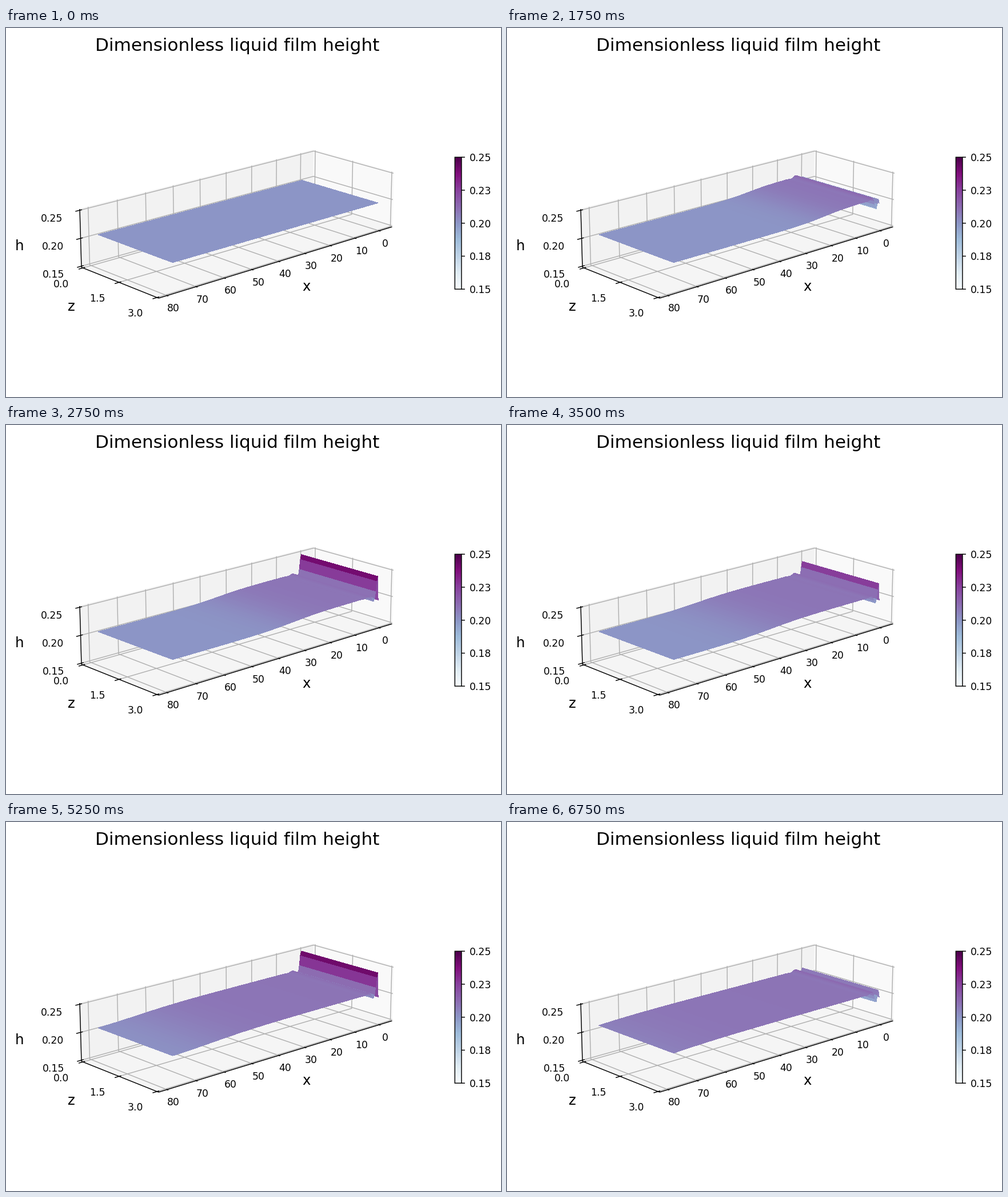
These frames come from a looping animation (866 px wide and 646 px high, 7000 ms). A matplotlib script:

```python
import numpy as np
import matplotlib.pyplot as plt
from matplotlib.animation import FuncAnimation
from matplotlib.collections import LineCollection, PolyCollection
from matplotlib.patches import Rectangle

W, H, DPI = 866, 646, 128
FRAMES, INTERVAL = 28, 250
LINE = 0.82
GRID = "#b0b0b0"
H_MIN, H_MAX = 0.15, 0.25
TICK_PX, LABEL_PX, TITLE_PX = 17.3, 24.4, 31.13

plt.rcParams["font.family"] = "DejaVu Sans"

fig = plt.figure(figsize=(W / DPI, H / DPI), dpi=DPI, facecolor="white")
ax = fig.add_axes([0, 0, 1, 1])
ax.axis("off")


def project(s, r, k):
    """Perspective view of the unit box: s along x, r along z, k up."""
    d = 1 + 0.122 * s - 0.049 * r - 0.0104 * k
    u = (132 + 470.8 * s + 121.9 * r - 4.34 * k) / d
    v = (419 - 76.3 * s + 30.8 * r - 105.3 * k) / d
    return u, v


def box_s(x):
    return 0.032 + (80 - x) / 88.3


def box_r(z):
    return 0.02 + 0.96 * z / 3


def box_k(h):
    return 0.02 + 0.96 * (h - H_MIN) / (H_MAX - H_MIN)


def path(*points):
    return [project(*p) for p in points]


def text(x, y, label, px=TICK_PX):
    ax.text(x, y, label, size=px * 72 / DPI, color="black",
            ha="center", va="baseline")


def lines(paths, color, z):
    ax.add_collection(LineCollection(paths, colors=color, linewidths=LINE,
                                     zorder=z))


def tick_label(point, offset, label):
    u, v = project(*point)
    text(u + offset[0], v + offset[1] + 6.4, label)


def draw_box():
    panes = [
        (path((0, 0, 0), (1, 0, 0), (1, 0, 1), (0, 0, 1)), "#f2f2f2"),
        (path((1, 0, 0), (1, 1, 0), (1, 1, 1), (1, 0, 1)), "#f9f9f9"),
        (path((0, 0, 0), (1, 0, 0), (1, 1, 0), (0, 1, 0)), "#f5f5f5"),
    ]
    colors = [c for _, c in panes]
    ax.add_collection(PolyCollection([p for p, _ in panes], facecolors=colors,
                                     edgecolors=colors, linewidths=LINE,
                                     zorder=1))

    grid, ticks = [], []
    t_out, t_in = 0.2 / 12, 0.1 / 12
    for x in range(0, 81, 10):
        s = box_s(x)
        grid.append(path((s, 1, 0), (s, 0, 0), (s, 0, 1)))
        ticks.append(path((s, 1 + t_out, 0), (s, 1 - t_in, 0)))
        tick_label((s, 1, 0), (10.9, 21.3), str(x))
    for z in (0, 1.5, 3):
        r = box_r(z)
        grid.append(path((0, r, 0), (1, r, 0), (1, r, 1)))
        ticks.append(path((-t_out, r, 0), (t_in, r, 0)))
        tick_label((0, r, 0), (-38.1, 27.1), f"{z:.1f}")
    for h in (0.15, 0.20, 0.25):
        k = box_k(h)
        grid.append(path((0, 0, k), (1, 0, k), (1, 1, k)))
        ticks.append(path((-t_out, 0, k), (t_in, 0, k)))
        tick_label((0, 0, k), (-49, 13.3), f"{h:.2f}")
    lines(grid, GRID, 2)

    axes = [path((0, 1, 0), (1, 1, 0)),
            path((0, 0, 0), (0, 1, 0)),
            path((0, 0, 0), (0, 0, 1))]
    lines(axes + ticks, "black", 3)

    text(525.5, 459.8, "x", LABEL_PX)
    text(114, 494.8, "z", LABEL_PX)
    text(23.5, 388.6, "h", LABEL_PX)


def draw_colorbar():
    left, right, top, bottom = 785.3, 796.9, 226.2, 457.2
    ramp = np.linspace(1, 0, 256)[:, None]
    ax.imshow(ramp, cmap="BuPu", vmin=0, vmax=1, aspect="auto", zorder=2,
              extent=(left, right, bottom, top))
    ax.add_patch(Rectangle((left, top), right - left, bottom - top,
                           fill=False, ec="black", lw=LINE, zorder=3,
                           snap=False))
    labels = ("0.15", "0.18", "0.20", "0.23", "0.25")
    for y, label in zip(np.linspace(bottom, top, 5), labels):
        ax.plot([right, right + 6], [y, y], color="black", lw=LINE, zorder=3,
                solid_capstyle="butt", snap=False)
        text(830.5, y + 7, label)


draw_box()
draw_colorbar()
text(404.7, 39.7, "Dimensionless liquid film height", TITLE_PX)
ax.set_xlim(0, W)
ax.set_ylim(H, 0)

xs = np.linspace(0, 77.4, 200)
film = PolyCollection([], cmap="BuPu", linewidths=0, antialiaseds=False,
                      zorder=5)
film.set_clim(H_MIN, H_MAX)
ax.add_collection(film, autolim=False)


def film_height(i):
    """Spreading front plus a damped wave that travels from the inlet."""
    h = np.full_like(xs, 0.2)
    if i == 0:
        return h
    reach = 1.5 + 2.95 * i
    front = 1 / (1 + np.exp(1.702 * (xs - reach) / (2.9 * np.sqrt(i))))
    run = np.maximum(xs - 0.6, 0)
    phase = 0.3012 * (i - 7) - 0.01 - run / 3.9
    wave = 0.0375 * np.exp(-run / 1.2) * np.sin(2 * np.pi * phase)
    h += front * (0.0098 + wave)
    h[0] = 0.2
    return h


def update(i):
    h = film_height(i)
    s, k = box_s(xs), box_k(h)
    back = np.column_stack(project(s, box_r(0), k))
    front = np.column_stack(project(s, box_r(3), k))
    film.set_verts(np.stack([back[:-1], back[1:], front[1:], front[:-1]],
                            axis=1))
    film.set_array((h[:-1] + h[1:]) / 2)
    return [film]


anim = FuncAnimation(fig, update, frames=FRAMES, interval=INTERVAL,
                     init_func=lambda: update(0), repeat=True,
                     repeat_delay=0, blit=False)
plt.show()
```
